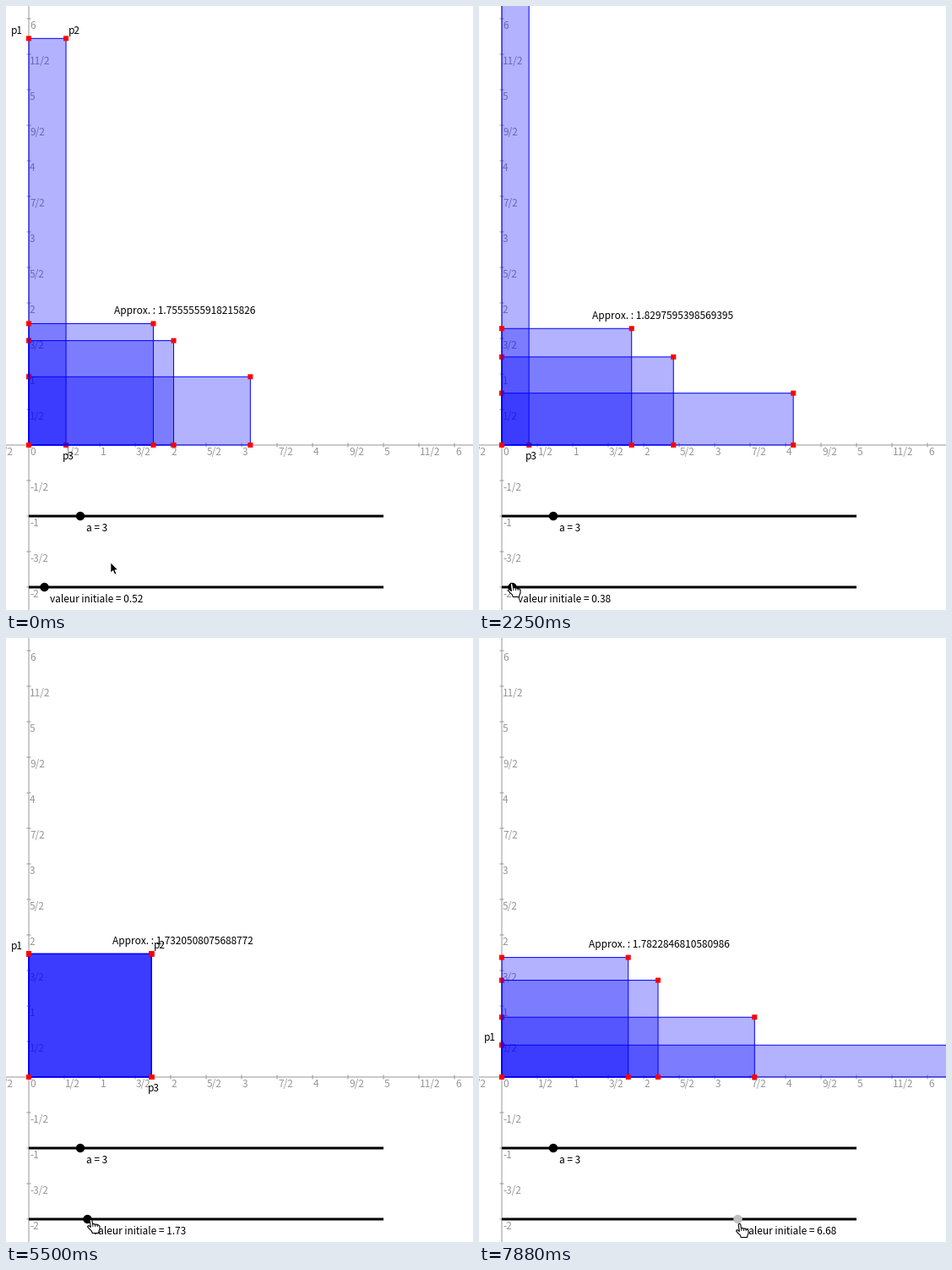
Animation, 553 px wide and 714 px high, one loop 8 s. Source, as a matplotlib script:

```python
import matplotlib.pyplot as plt
import numpy as np
from matplotlib.animation import FuncAnimation
from matplotlib.patches import Circle, Polygon, Rectangle

W, H = 553, 714
OX, OY, UNIT = 27, 519, 84
FRAMES, INTERVAL = 64, 125
FONT, SIZE = "Noto Sans CJK JP", 11.85
GREY = "#969696"
A = 3

# One point equals one pixel at 72 dpi
fig = plt.figure(figsize=((W + 0.01) / 72, (H + 0.01) / 72), dpi=72, facecolor="white")
ax = fig.add_axes([0, 0, 1, 1])
ax.set_xlim(0, W)
ax.set_ylim(H, 0)
ax.axis("off")

# Drag keys: tick, knob offset. Pointer keys: tick, x from the knob, y
DRAG = np.array([(11, 18), (20, 10), (32, 10), (33, 13), (35, 20), (44, 69), (52, 151), (63, 279)])
POINTER = np.array([(0, 79, 658), (3, 34, 690), (9, -0.5, 685), (18, -5, 682),
                    (33, -3, 682), (44, -1, 687), (52, 5, 692), (63, -2, 692)])

# The picture follows the pointer only at these ticks
UPDATES = [*range(21), *(int(33.2 + 2.75 * k) for k in range(12))]

ARROW = np.array([(0, 0), (0, 12), (2.8, 9.4), (4.8, 14), (6.8, 13.1), (4.8, 8.7), (8.4, 8.5)])
HAND = np.array([(3.6, 0.8), (4.6, 0.3), (5.7, 1), (6.6, 6), (8, 5.4), (9.4, 6.4), (10.8, 5.9),
                 (12, 7), (13.4, 6.8), (15, 8.3), (15, 12), (14, 14), (13.6, 16.5), (6.2, 16.5),
                 (5.4, 14), (2.6, 11.5), (0.6, 9), (1.2, 7.7), (2.6, 8), (4.4, 9.6), (3.2, 2)])

live = []


def ease(keys, tick, col=1):
    return np.interp(tick, keys[:, 0], keys[:, col])


def text(x, y, s, color="black", size=SIZE, z=6, weight="normal"):
    """Text from its left edge, with digits centred on y."""
    return ax.text(x, y + 0.36 * size, s, color=color, fontsize=size, family=FONT,
                   weight=weight, ha="left", va="baseline", zorder=z)


def line(xs, ys, color, lw, z):
    return ax.plot(xs, ys, color=color, lw=lw, zorder=z, snap=False,
                   solid_capstyle="butt")[0]


def shape(kind, *args, **style):
    patch = kind(*args, snap=False, **style)
    ax.add_patch(patch)
    live.append(patch)


def halves(k):
    return str(k // 2) if k % 2 == 0 else f"{k}/2"


def draw_axes():
    line([0, W], [OY, OY], GREY, 1, 1)
    line([OX, OX], [0, H], GREY, 1, 1)
    for k in range(-4, 13):
        x, y = OX + k * UNIT / 2, OY - k * UNIT / 2
        line([x, x], [OY - 2.5, OY + 2.5], GREY, 1, 1)
        text(x + 1, OY + 8, halves(k), GREY, z=1)
        if k:
            line([OX - 2.5, OX + 2.5], [y, y], GREY, 1, 1)
            text(OX + 1, y + 8, halves(k), GREY, z=1)


def draw_sliders():
    for y in (603, 687):
        line([OX, OX + 420], [y, y], "black", 3, 5)
    ax.add_patch(Circle((88, 603), 5.2, color="black", lw=0, zorder=5))
    text(95, 617, f"a = {A}")


def draw_rect(x, z):
    """Rectangle of area A and width x, with its corner marks."""
    w, h = x * UNIT, A / x * UNIT
    box = (OX, OY - h), w, h
    shape(Rectangle, *box, facecolor=(0, 0, 1, 0.3), edgecolor="none", zorder=z)
    shape(Rectangle, *box, facecolor="none", edgecolor="blue", lw=1, zorder=z + 0.02)
    for cx in (OX, OX + w):
        for cy in (OY, OY - h):
            shape(Rectangle, (cx - 3, cy - 3), 6, 6, color="red", lw=0, zorder=z + 0.04)


def draw_pointer(x, y, hand):
    if not hand:
        shape(Polygon, ARROW + (x, y), facecolor="black", edgecolor="white", lw=0.6, zorder=9)
        return
    shape(Polygon, HAND + (x, y), facecolor="white", edgecolor="black", lw=1.1, zorder=9)
    for dx in (6.7, 9.4, 12):
        live.append(line([x + dx, x + dx + 0.2], [y + 6, y + 9], "black", 0.9, 9.1))


def draw_tip(x, y):
    shape(Rectangle, (x + 0.5, y + 0.5), 66, 28, facecolor="#ffffb4", edgecolor="#777755",
          lw=1, zorder=8)
    live.append(text(x + 3, y + 14, "Ce point", "#1e1e1e", 14, 8.1, "bold"))


def update(f):
    while live:
        live.pop().remove()
    tick = max(t for t in UPDATES if t <= f)
    pos = round(ease(DRAG, tick))
    start = 0.1 + pos * 9.9 / 420

    # Each width is the mean of the previous sides
    x = start
    for i in range(4):
        draw_rect(x, 2 + 0.1 * i)
        last, x = x, (x + A / x) / 2
    top = OY - A / last * UNIT
    live.append(text(OX + last * UNIT - 46.5, top - 15.5, f"Approx. : {last!r}"))

    right, top = OX + start * UNIT, OY - A / start * UNIT
    for px, py, name in ((OX - 21, top - 9.5, "p1"), (right + 3, top - 10, "p2"),
                         (right - 4, OY + 13, "p3")):
        if px < W and py > 0:
            live.append(text(px, py, name))

    knob = OX + 0.5 + pos
    lit = 25 <= f < 33 or f == FRAMES - 1
    shape(Circle, (knob, 687), 5.2, color="#c0c0c0" if lit else "black", lw=0, zorder=5.5)
    live.append(text(knob + 6.5, 701, f"valeur initiale = {round(start, 2):g}"))

    cx = round(knob + ease(POINTER, tick))
    cy = round(ease(POINTER, tick, 2))
    if 8 <= f <= 10:
        draw_tip(cx + 6, cy - 31)
    draw_pointer(cx, cy, tick >= 2)
    return live


draw_axes()
draw_sliders()
anim = FuncAnimation(fig, update, frames=FRAMES, init_func=lambda: [], interval=INTERVAL,
                     repeat=True, repeat_delay=0, blit=False)
plt.show()
```
